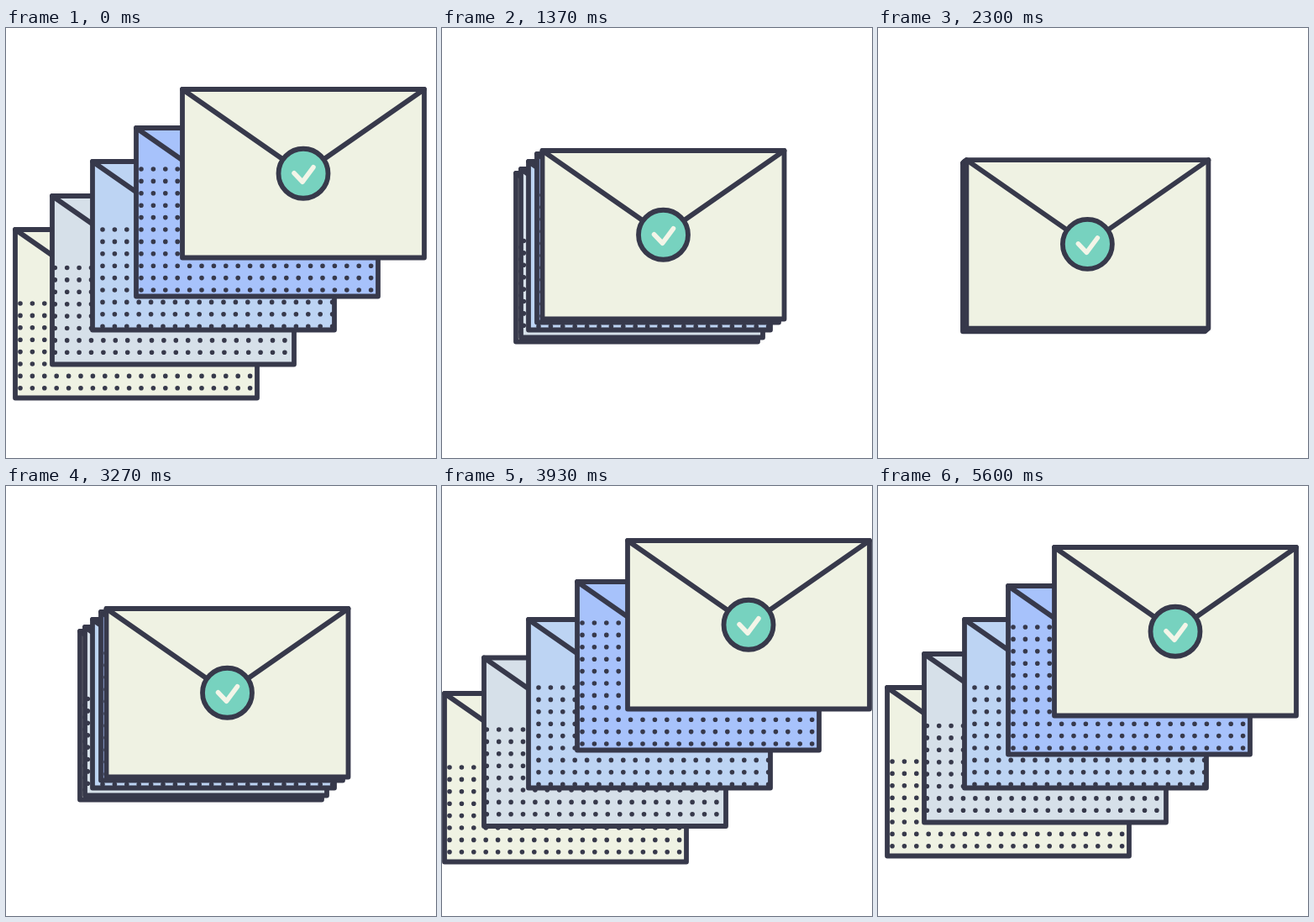
Write an HTML page with a canvas that moves like this. It is 512x512 px and loops after 5630 ms.

```html
<!DOCTYPE html>
<html lang="en">
<head>
<meta charset="utf-8">
<title>Envelopes</title>
<style>
html, body { margin: 0; width: 100%; height: 100%; overflow: hidden; background: #fff; }
canvas { display: block; width: 100vw; height: 100vh; }
</style>
</head>
<body>
<canvas id="stage" width="512" height="512"></canvas>
<script>
const ctx = document.getElementById('stage').getContext('2d');
const LOOP = 5630, FRAME = 1000 / 30;
const INK = '#37394b', CREAM = '#eff2e3', MINT = '#77d2bf';
const W = 288, H = 200.5, GAP = 14.4;
const HOME = { x: 103, y: 159 };

// Back to front. Poses are offsets from HOME; dots: first x, first y, rows.
const envelopes = [
  { fill: CREAM, dots: [6, 88, 8], peek: [-15, 14], open: [-92, 81], wide: [-100, 88] },
  { fill: '#d6e0e9', dots: [3.3, 85.5, 8], peek: [-9, 9], open: [-48, 41], wide: [-53, 45.5] },
  { fill: '#bdd4f3', dots: [12, 81, 9], peek: [0, 0], open: [0, 0], wide: [0, 0] },
  { fill: '#a7c2fb', dots: [6, 49, 11], peek: [10, -9], open: [52, -40], wide: [58, -45] },
  { fill: CREAM, seal: true, peek: [16.5, -13], open: [107, -86], wide: [118, -94] }
];
envelopes.forEach(e => { e.shut = [0, 0]; });

const easeOut = p => Math.sin(p * Math.PI / 2);
const easeInOut = p => (1 - Math.cos(p * Math.PI)) / 2;

const closing = (start, end) => ({
  start, rest: 'shut',
  keys: [[-FRAME, 'open'], [2 * FRAME, 'wide', easeOut], [end - start, 'shut', easeInOut]]
});
const opening = (start, end) => ({
  start, rest: 'open',
  keys: [[0, 'peek'], [(end - start) * 0.42, 'wide', easeOut], [end - start, 'open', easeInOut]]
});
const moves = [
  closing(70, 470), opening(1370, 1930),
  closing(1970, 2330), opening(3270, 3800),
  closing(3870, 4200), opening(5130, 5600)
];

// Blend between two named poses at time t, in whole animation frames.
function poseAt(t) {
  const move = moves.filter(m => t >= m.start).pop();
  if (!move) return { from: 'open', to: 'open', mix: 0 };
  const u = Math.floor((t - move.start) / FRAME + 0.25) * FRAME;
  for (let i = 1; i < move.keys.length; i++) {
    const [t0, from] = move.keys[i - 1];
    const [t1, to, ease] = move.keys[i];
    if (u < t1) return { from, to, mix: ease((u - t0) / (t1 - t0)) };
  }
  return { from: move.rest, to: move.rest, mix: 0 };
}

function line(points, color, width) {
  ctx.beginPath();
  points.forEach(([x, y]) => ctx.lineTo(x, y));
  ctx.strokeStyle = color;
  ctx.lineWidth = width;
  ctx.stroke();
}

function drawDots([x0, y0, rows]) {
  ctx.fillStyle = INK;
  ctx.beginPath();
  for (let r = 0; r < rows; r++) {
    for (let c = 0; c < 20; c++) {
      const x = x0 + c * GAP, y = y0 + r * GAP;
      ctx.moveTo(x + 2.8, y);
      ctx.arc(x, y, 2.8, 0, Math.PI * 2);
    }
  }
  ctx.fill();
}

function drawSeal() {
  ctx.beginPath();
  ctx.arc(W / 2, H / 2, 29.5, 0, Math.PI * 2);
  ctx.fillStyle = MINT;
  ctx.fill();
  ctx.strokeStyle = INK;
  ctx.lineWidth = 5.8;
  ctx.stroke();
  ctx.save();
  ctx.translate(W / 2, H / 2);
  line([[-11, -0.5], [-1, 10], [12, -7.5]], '#f3f5e8', 5.5);
  ctx.restore();
}

function drawEnvelope(e, x, y) {
  ctx.save();
  ctx.translate(x, y);
  ctx.fillStyle = e.fill;
  ctx.fillRect(0, 0, W, H);
  if (e.dots) {
    ctx.save();
    ctx.beginPath();
    ctx.rect(0, 0, W, H);
    ctx.clip();
    drawDots(e.dots);
    ctx.restore();
  }
  line([[0, 0], [W / 2, H / 2], [W, 0]], INK, 5.8);
  ctx.strokeRect(0, 0, W, H);
  if (e.seal) drawSeal();
  ctx.restore();
}

function draw(t) {
  ctx.fillStyle = '#fff';
  ctx.fillRect(0, 0, 512, 512);
  ctx.lineJoin = ctx.lineCap = 'round';
  const { from, to, mix } = poseAt(t);
  for (const e of envelopes) {
    const [dx, dy] = e[from].map((v, i) => v + (e[to][i] - v) * mix);
    drawEnvelope(e, HOME.x + dx, HOME.y + dy);
  }
}

const begin = performance.now();
function tick() {
  draw((performance.now() - begin) % LOOP);
  requestAnimationFrame(tick);
}
tick();
</script>
</body>
</html>
```
